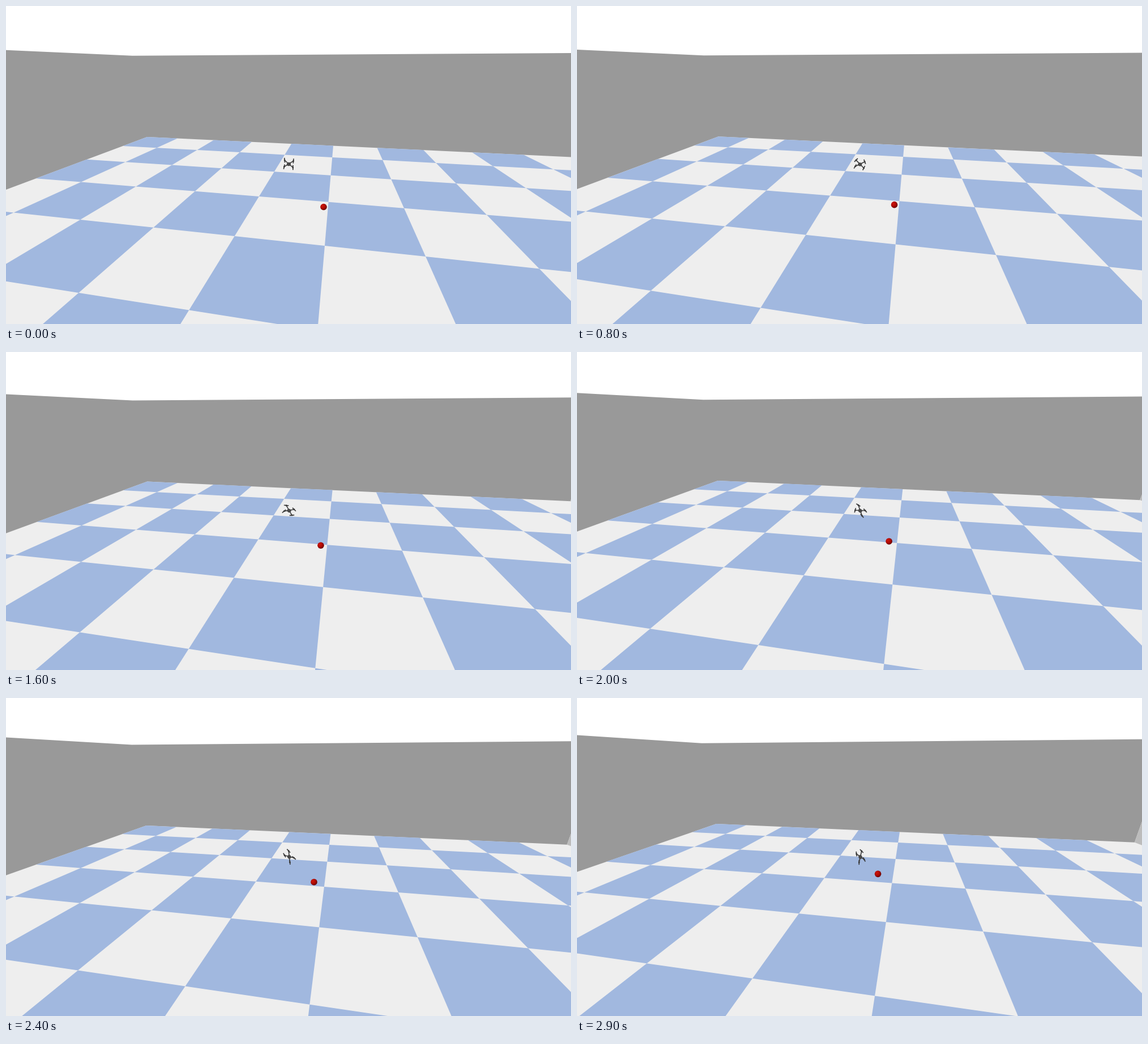
Animation, 998 px wide and 561 px high, one loop 3 s. Source, as an HTML page with a canvas:

```html
<!DOCTYPE html>
<html lang="en">
<head>
<meta charset="utf-8">
<title>Drone and ball</title>
<style>
  html, body { margin: 0; width: 100%; height: 100%; overflow: hidden; background: #fff; }
  canvas { display: block; }
</style>
</head>
<body>
<canvas id="stage" width="998" height="561"></canvas>
<script>
const ctx = document.getElementById('stage').getContext('2d');
const W = 998, H = 561, LOOP = 3000, STEP = 100;
const rad = deg => deg * Math.PI / 180;
const focal = H / 2 / Math.tan(rad(30));
const sinP = Math.sin(rad(20)), cosP = Math.cos(rad(20));
const sinY = Math.sin(rad(10)), cosY = Math.cos(rad(10));

// Room in metres: u runs away from the viewer, v to the right, z up.
const LEFT = -4.88, RIGHT = 4.9, FAR = 3.88, NEAR = -2, TOP = 2, SKIRT = -0.1;
const ball = { u: -0.990, v: 0.0 , z: 0.9945 };

// The camera trails the drone with a fixed orientation.
function cameraAt(t) {
  const p = t / 2.9;
  return {
    u: -2.469 - 0.018 * t - 0.0026 * t ** 3,
    v: 0.0465 + 0.1158 * p ** 2.9,
    z: 1.795 - 0.105 * p ** 2.2
  };
}
const start = cameraAt(0);
const ballX = 0.2106, ballY = 1.4645;
ball.u = start.u + ballX * sinY + ballY * cosY;
ball.v = start.v + ballX * cosY - ballY * sinY;

function project(cam, u, v, z) {
  const du = u - cam.u, dv = v - cam.v, dz = z - cam.z;
  const x = du * sinY + dv * cosY, y = du * cosY - dv * sinY;
  const depth = y * cosP - dz * sinP;
  return [W / 2 + focal * x / depth, H / 2 - focal * (y * sinP + dz * cosP) / depth];
}

function fillShape(cam, color, points) {
  ctx.fillStyle = color;
  ctx.beginPath();
  for (const p of points) ctx.lineTo(...project(cam, ...p));
  ctx.fill();
}

function floorRect(cam, color, u0, u1, v0, v1) {
  fillShape(cam, color, [[u0, v0, 0], [u1, v0, 0], [u1, v1, 0], [u0, v1, 0]]);
}

function drawRoom(cam) {
  fillShape(cam, '#999999', [
    [NEAR, LEFT, TOP], [FAR, LEFT, TOP], [FAR, RIGHT, TOP],
    [FAR, RIGHT, SKIRT], [FAR, LEFT, SKIRT], [NEAR, LEFT, SKIRT]
  ]);
  fillShape(cam, '#bcbcbc', [
    [FAR, RIGHT, TOP], [1, RIGHT, TOP], [1, RIGHT, SKIRT], [FAR, RIGHT, SKIRT]
  ]);
  floorRect(cam, '#eeeeee', NEAR, FAR, LEFT, RIGHT);
  for (let u = NEAR; u < FAR; u++) {
    for (let v = -5; v < RIGHT; v++) {
      if ((u + v) % 2) continue;
      floorRect(cam, '#a1b8df', u, Math.min(u + 1, FAR),
        Math.max(v, LEFT), Math.min(v + 1, RIGHT));
    }
  }
}

function drawBall(cam) {
  const [x, y] = project(cam, ball.u, ball.v, ball.z);
  const shade = ctx.createRadialGradient(x - 2, y - 2, 0.5, x - 1, y - 1, 7.5);
  shade.addColorStop(0, '#cc1408');
  shade.addColorStop(0.5, '#b00a04');
  shade.addColorStop(1, '#5c0000');
  ctx.fillStyle = shade;
  ctx.beginPath();
  ctx.arc(x, y, 5.8, 0, 7);
  ctx.fill();
}

// Propeller headings in degrees at the given seconds.
const times = [0, 0.8, 1.2, 1.6, 2, 2.4, 2.9];
const props = [
  { i: -1, j: -1, turn: [85, 135, 162, 186, 212, 227, 225] },
  { i: 1, j: -1, turn: [95, 69, 50, 45, 48, 40, 63] },
  { i: -1, j: 1, turn: [103, 120, 116, 140, 105, 60, 83] },
  { i: 1, j: 1, turn: [90, 117, 150, 175, 229, 263, 270] }
];

function sample(values, t) {
  let k = 0;
  while (k < times.length - 2 && t > times[k + 1]) k++;
  const f = (t - times[k]) / (times[k + 1] - times[k]);
  return values[k] + (values[k + 1] - values[k]) * f;
}

function line(x0, y0, x1, y1, width) {
  ctx.lineWidth = width;
  ctx.beginPath();
  ctx.moveTo(x0, y0);
  ctx.lineTo(x1, y1);
  ctx.stroke();
}

function drawDrone(t) {
  const p = t / 2.9;
  const cx = 499.5 + p, cy = 278.5 + 1.5 * p;
  const a = rad(5 + 68 * p ** 1.9), b = rad(94 + 57 * p ** 2);
  const la = 7.8, lb = 5.8 - 0.6 * p;
  ctx.strokeStyle = '#3d3d3d';
  for (const { i, j, turn } of props) {
    const x = cx + i * la * Math.cos(a) + j * lb * Math.cos(b);
    const y = cy + i * la * Math.sin(a) + j * lb * Math.sin(b);
    const r = rad(sample(turn, t));
    const dx = 4.2 * Math.cos(r), dy = 4.2 * Math.sin(r);
    line(cx, cy, x, y, 1.6);
    line(x - dx, y - dy, x + dx, y + dy, 1.7);
    ctx.fillStyle = '#333333';
    ctx.fillRect(x - 1.2, y - 1.2, 2.4, 2.4);
  }
  ctx.fillStyle = '#484848';
  ctx.beginPath();
  ctx.ellipse(cx, cy + 0.5, 3.6, 3.2, a, 0, 7);
  ctx.fill();
}

function render(now) {
  const t = Math.floor(now % LOOP / STEP) * STEP / 1000;
  const cam = cameraAt(t);
  ctx.fillStyle = '#ffffff';
  ctx.fillRect(0, 0, W, H);
  drawRoom(cam);
  drawBall(cam);
  drawDrone(t);
}

const began = performance.now();
function tick() {
  render(performance.now() - began);
  requestAnimationFrame(tick);
}
tick();
</script>
</body>
</html>
```
